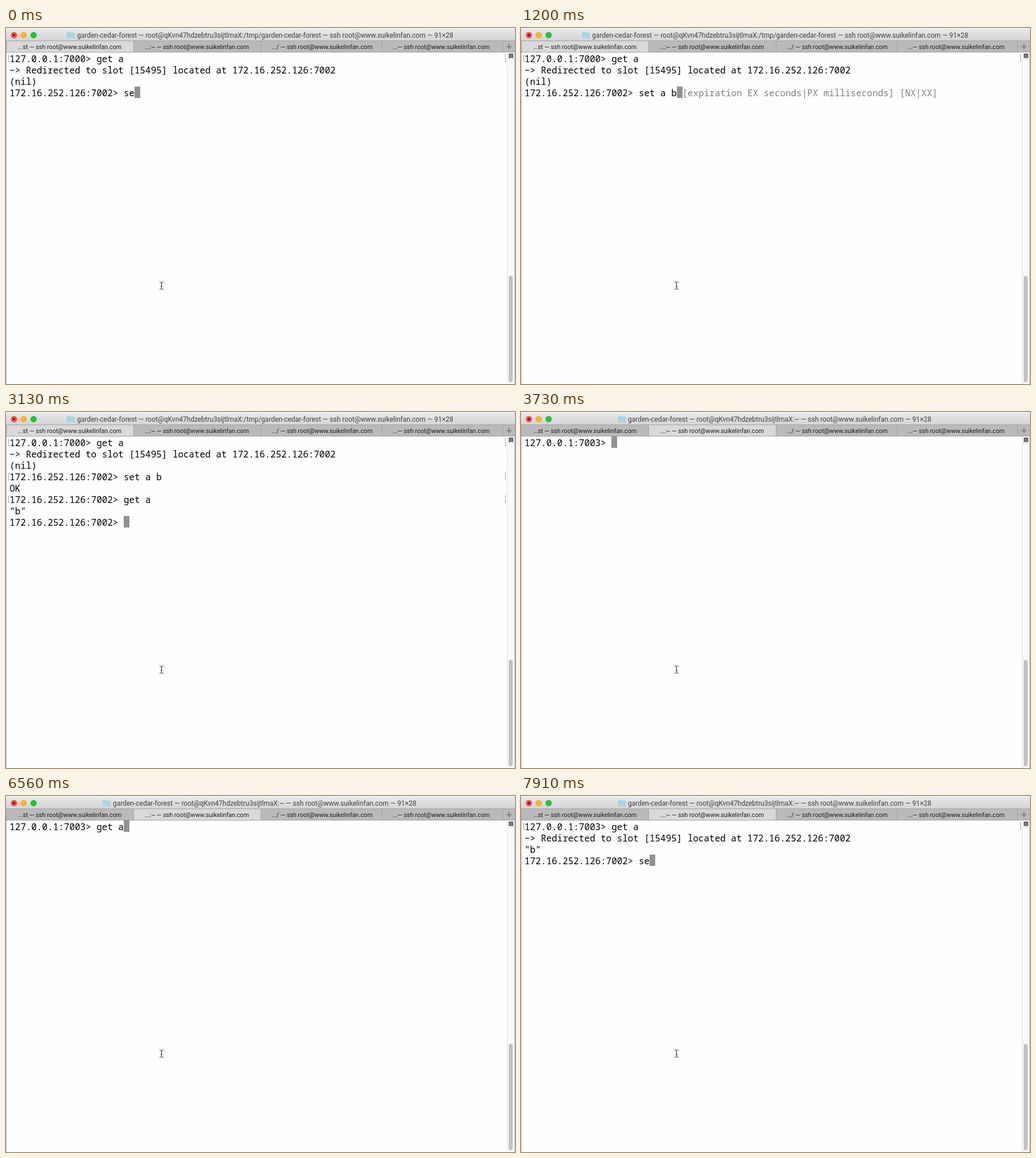
Write an HTML page that moves like this. It is 895 px wide and 626 px high and loops after 8000 ms.

```html
<!DOCTYPE html>
<html lang="en">
<head>
<meta charset="utf-8">
<title>Terminal</title>
<style>
  html, body { margin: 0; width: 100%; height: 100%; overflow: hidden; background: #fdfefd; }
  svg { display: block; width: 100%; height: 100%; }
  text { white-space: pre; }
  #title { font: 12px Roboto, sans-serif; fill: #404040; }
  #tabs text { font: 10.75px Roboto, sans-serif; fill: #1c1c1c; }
  #screen text { font: 500 15.93px "Noto Sans Mono", monospace; fill: #000; }
  #screen .hint { fill: #808080; font-weight: 400; }
  #screen path { fill: none; stroke: #a8a8a8; }
  #screen rect { fill: #929292; }
</style>
</head>
<body>
<svg viewBox="0 0 895 626">
  <defs>
    <linearGradient id="bar" x2="0" y2="1">
      <stop stop-color="#e9e8e9"/>
      <stop offset="1" stop-color="#d4d3d4"/>
    </linearGradient>
  </defs>
  <rect width="895" height="626" fill="#fdfefd"/>
  <rect width="895" height="2" fill="#f4f3ea"/>
  <rect y="2" width="895" height="21" fill="url(#bar)"/>
  <circle cx="14" cy="12.5" r="5.5" fill="#fc4a48"/>
  <circle cx="14" cy="12.5" r="2" fill="#6e0a08"/>
  <circle cx="31" cy="12.5" r="5.5" fill="#fdb225"/>
  <circle cx="48.5" cy="12.5" r="5.5" fill="#28c333"/>
  <path id="folder" d="M0 7.5q0-1 1-1h4l1.5 1.5H13q1 0 1 1V17q0 1-1 1H1q-1 0-1-1z" fill="#a3d6ee"/>
  <text id="title" y="17"></text>
  <g id="tabs"></g>
  <path d="M884.5 28v10M879.5 33h10" stroke="#555" fill="none"/>

  <rect x="881" y="43" width="14" height="583" fill="#fafafa"/>
  <path d="M881.5 43v583M881 55.5h14" stroke="#dedede" fill="none"/>
  <rect x="884" y="45" width="8" height="8" rx="1" fill="#555"/>
  <path d="M885 47.5h6M885 49.5h6M885 51.5h6" stroke="#bbb" stroke-width=".8"/>
  <rect x="884" y="436" width="7" height="187" rx="3.5" fill="#c1c1c1"/>
  <path d="M1 23v603M894.5 43v583" stroke="#b4b4b4" fill="none"/>

  <g id="screen"></g>
  <path d="M270 446.5q3 0 3.500 1.500q.5-1.500 3.500-1.500M273.500 448v10M270 459.500q3 0 3.500-1.500q.5 1.500 3.500 1.500M272 454.500h3"
        stroke="#222" fill="none"/>
</svg>
<script>
const LOOP = 8000, TAB_SWITCH = 3730;
const LEFT = 6.3, TOP = 43, CELL = 9.56, ROW = 20;

const PROJECT = "garden-cedar-forest";
const USER = "root@qKvn47hdzebtru3sijtlmaX";
const SSH = "ssh root@www.suikelinfan.com";
const windows = [
  { x: 125, path: "/tmp/" + PROJECT },
  { x: 188, path: "~" },
];
const tabs = [
  { x: 1, width: 224, textX: 21, label: "...st" },
  { x: 225, width: 224, textX: 244, label: "...:~" },
  { x: 449, width: 213, textX: 467, label: ".../" },
  { x: 662, width: 212, textX: 680, label: "..." },
];

const NODE = "172.16.252.126:7002> ";
const LOCAL = "127.0.0.1:7003> ";
const REDIRECT = "\u2212> Redirected to slot [15495] located at 172.16.252.126:7002";
const OPTIONS = "[expiration EX seconds|PX milliseconds] [NX|XX]";

const start = ["127.0.0.1:7000> get a", REDIRECT, "(nil)"];
const sent = [...start, NODE + "set a b"];
const stored = [...sent, "OK"];
const fetched = [...stored, NODE + "get a", '"b"'];
const remote = [LOCAL + "get a", REDIRECT, '"b"'];

// time, finished lines, line being typed, completion hint
const steps = [
  [0, start, NODE + "se"],
  [150, start, NODE + "set", " key value " + OPTIONS],
  [300, start, NODE + "set ", "key value " + OPTIONS],
  [600, start, NODE + "set a", " value " + OPTIONS],
  [900, start, NODE + "set a ", "value " + OPTIONS],
  [1200, start, NODE + "set a b", " " + OPTIONS],
  [1800, sent, ""],
  [1940, stored, NODE],
  [2390, stored, NODE + "ge"],
  [2540, stored, NODE + "get", " key"],
  [2690, stored, NODE + "get ", "key"],
  [2830, stored, NODE + "get a"],
  [3130, fetched, NODE],
  [TAB_SWITCH, [], LOCAL],
  [4330, [], LOCAL + "gh"],
  [4920, [], LOCAL + "g"],
  [5070, [], LOCAL],
  [5220, [], LOCAL + "gh"],
  [5960, [], LOCAL + "g"],
  [6110, [], LOCAL + "ge"],
  [6260, [], LOCAL + "get", " key"],
  [6410, [], LOCAL + "get ", "key"],
  [6560, [], LOCAL + "get a"],
  [7160, remote, NODE],
  [7760, remote, NODE + "s"],
  [7910, remote, NODE + "se"],
];

const byId = id => document.getElementById(id);
const escapeText = s => s.replace(/&/g, "&amp;").replace(/</g, "&lt;");
const columnX = column => LEFT + column * CELL;

function textAt(row, column, content, className = "") {
  return `<text class="${className}" x="${columnX(column)}" y="${TOP + row * ROW + 16.5}">${escapeText(content)}</text>`;
}

function brackets(row) {
  const y = TOP + row * ROW + 4.5;
  return `<path d="M6.5 ${y}h-2v12h2M876.500 ${y}h2v12h-2"/>`;
}

function drawScreen([, lines, typed, hint = ""]) {
  const row = lines.length;
  const isCommand = line => /^\d.*> ./.test(line);
  byId("screen").innerHTML =
    lines.map((line, i) => textAt(i, 0, line) + (isCommand(line) ? brackets(i) : "")).join("") +
    textAt(row, 0, typed) +
    `<rect x="${Math.round(columnX(typed.length))}" y="${TOP + row * ROW}" width="10" height="20"/>` +
    textAt(row, typed.length, hint, "hint");
}

function drawChrome(active) {
  const { x, path } = windows[active];
  byId("title").setAttribute("x", x);
  byId("title").textContent = `${PROJECT} — ${USER}:${path} — ${SSH} — 91×28`;
  byId("folder").setAttribute("transform", `translate(${x - 18})`);
  byId("tabs").innerHTML =
    `<rect y="22" width="895" height="21" fill="#a2a2a2"/>
     <rect x="874" y="23" width="21" height="19" fill="#bababa"/>` +
    tabs.map((tab, i) =>
      `<rect x="${tab.x}" y="23" width="${tab.width - 1}" height="19" fill="${i === active ? "#d9d9d9" : "#bababa"}"/>
       <text x="${tab.textX}" y="36.500">${tab.label}${i < 3 ? " " : ""}— ${SSH}</text>`).join("");
}

let shown = null;
function frame() {
  const time = performance.now() % LOOP;
  const step = steps.findLast(([at]) => at <= time);
  if (step !== shown) {
    shown = step;
    drawChrome(step[0] < TAB_SWITCH ? 0 : 1);
    drawScreen(step);
  }
  requestAnimationFrame(frame);
}
frame();
</script>
</body>
</html>
```
